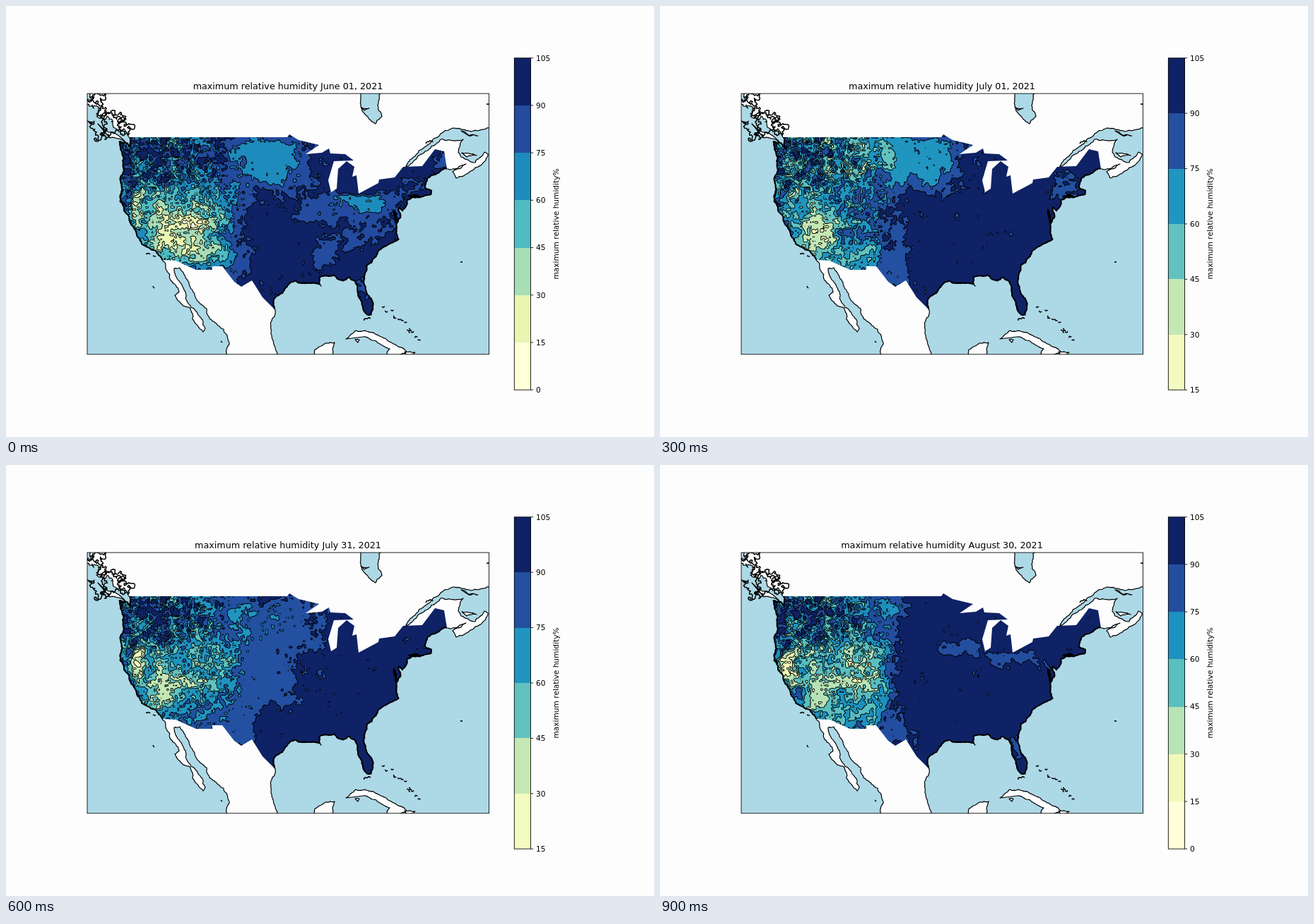
An HTML page with a canvas for the animation above (1 s loop, 917x611 px).

```html
<!DOCTYPE html>
<html lang="en">
<head>
<meta charset="utf-8">
<title>Maximum relative humidity</title>
<style>
html, body { margin: 0; width: 100%; height: 100%; overflow: hidden; background: #fdfdfd; }
canvas, svg { position: absolute; left: 0; top: 0; display: block; }
text { font-family: "DejaVu Sans", Verdana, sans-serif; font-size: 10.61px; fill: #000; }
#title { font-size: 12.73px; }
.line { fill: none; stroke: #000; stroke-width: .85; }
</style>
</head>
<body>
<canvas id="map" width="917" height="611"></canvas>
<svg width="917" height="611" viewBox="0 0 917 611">
  <rect class="line" x="115" y="124.1" width="568.5" height="369.7"/>
  <text id="title" x="399" y="117.7" text-anchor="middle"></text>
  <g id="bar"></g>
  <rect class="line" x="719.3" y="73.7" width="23.2" height="470.5"/>
  <text transform="translate(781.8 309) rotate(-90)" text-anchor="middle">maximum relative humidity%</text>
</svg>
<script>
// Key points of the coast, counter-clockwise; ragged() adds the detail between them.
const fjords = "108,124 122,140 130,149 139,160 152,172 172,183";
const pacific = "174,186 175,199 172,194 160,192 166,215 162,251 164,260 161,277 174,299 182,317 192,338 211,347 221,360";
const baja = "221,360 233,389 245,405 239,410 261,429 264,444 279,462 282,457 270,434 250,398 238,372 246,371 259,392 284,429 308,458 316,477 312,488 316,500";
const mexico = "392,505 380,482 376,467 381,431";
const gulf = "381,431 380,415 399,396 409,390 429,393 446,397 444,385 464,382 477,390 485,385 497,397 500,415 511,438 517,438 519,419 508,381";
const atlantic = "508,381 511,368 529,346 542,338 556,331 553,318 549,290 553,309 559,298 556,286 561,291 568,275 584,270 571,270 602,267 602,261 594,258 597,244 624,231";
const canada = "624,231 651,224 632,235 637,244 673,225 682,210 677,207 664,222 644,214 640,207 647,189 615,189 590,209 566,228 600,195 630,174 690,174";
const rio = "240,361 269,374 292,374 292,369 306,369 323,391 333,398 348,389 363,413 381,431";
const north = "624,231 620,206 607,203 589,227 562,228 550,243 528,246 527,251 499,266 496,240 490,242 493,228 482,220 470,231 468,259 460,264 456,247 464,220 492,219 480,210 459,209 457,202 447,208 424,210 443,197 414,190 401,182 398,186 174,186";
const bay = "502,118 505,150 523,167 525,162 532,157 527,135 533,118";
const islands = [
  "130,167 155,181 170,194 147,187",
  "503,144 514,145 507,148",
  "644,177 668,184 655,184",
  "645,208 666,212 652,214",
  "481,472 495,460 520,463 548,479 567,490 538,495 543,486 524,475 505,469",
  "494,473 500,473 498,477",
  "435,500 437,487 452,478 465,477 461,500",
  "564,490 579,491 570,500"
];
const specks = ["643,363 646,363", "208,397 210,400", "304,475 306,477", "198,351 204,352", "208,354 212,355", "507,446 516,443", "680,139 684,138", "594,195 604,193"];

// Areas of the map: centre and half size.
const area = (x, y, rx, ry) => ({ x, y, rx, ry });
const areas = {
  northwest: area(225, 222, 72, 46),
  coast: area(166, 225, 9, 46),
  basin: area(238, 283, 74, 34),
  southwest: area(248, 325, 68, 50),
  desert: area(247, 320, 36, 27),
  mojave: area(226, 322, 27, 26),
  valley: area(184, 287, 10, 21),
  rockies: area(285, 295, 30, 42),
  arizona: area(272, 352, 36, 20),
  montana: area(308, 210, 30, 25),
  border: area(330, 190, 72, 6),
  plains: area(345, 225, 78, 38),
  dakotas: area(375, 215, 40, 31),
  nebraska: area(366, 270, 33, 35),
  kansas: area(368, 305, 43, 36),
  colorado: area(327, 302, 13, 18),
  highPlains: area(330, 325, 20, 45),
  westTexas: area(331, 373, 18, 24),
  lakes: area(432, 222, 30, 34),
  iowa: area(426, 259, 28, 13),
  midwest: area(478, 284, 74, 20),
  ohio: area(500, 275, 38, 12),
  tennessee: area(450, 350, 20, 24),
  carolina: area(515, 320, 42, 23),
  newEngland: area(572, 247, 26, 18),
  maine: area(610, 217, 14, 13),
  florida: area(505, 400, 8, 15)
};

// Humidity that each area is drawn towards, painted in order.
const june01 = { northwest: 74, plains: 82, dakotas: 65, basin: 60, southwest: 44, desert: 25, valley: 38, coast: 94,
  midwest: 83, ohio: 68, tennessee: 84, carolina: 88, newEngland: 89, maine: 89, florida: 87 };
const june21 = { northwest: 86, plains: 82, kansas: 82, dakotas: 66, nebraska: 66, highPlains: 80, westTexas: 70,
  basin: 52, southwest: 37, desert: 24, valley: 40, lakes: 83, maine: 84, coast: 95 };
const july01 = { plains: 80, northwest: 64, basin: 64, southwest: 62, rockies: 74, dakotas: 66, montana: 56, mojave: 34,
  arizona: 60, highPlains: 89, westTexas: 82, coast: 86, newEngland: 87 };
const july21 = { plains: 80, kansas: 82, lakes: 84, northwest: 82, montana: 70, basin: 66, southwest: 64, mojave: 42,
  rockies: 66, valley: 30, arizona: 66, highPlains: 94, westTexas: 82 };
const aug10 = { plains: 80, nebraska: 80, kansas: 82, dakotas: 72, highPlains: 66, northwest: 70, basin: 52,
  southwest: 58, rockies: 48, mojave: 34, valley: 36, arizona: 91, border: 94, westTexas: 82, midwest: 92, newEngland: 88, coast: 92 };
const aug20 = { northwest: 82, basin: 80, mojave: 52, valley: 42, highPlains: 82, colorado: 58, westTexas: 84, lakes: 90, newEngland: 89 };
const aug30 = { northwest: 72, montana: 70, basin: 50, southwest: 60, rockies: 44, mojave: 37, valley: 28, arizona: 58,
  coast: 94, westTexas: 85, iowa: 84, ohio: 84, florida: 88 };
const terrain = { northwest: 44, basin: 30, southwest: 17, rockies: 24, coast: 40 };

const day = (date, maps, min, low = min < 15 ? 0 : 15, step = 15, high = 105) => ({ date, maps, min, low, step, high });
// Two maps stand for their average.
const days = [
  day("June 01", [june01], 10), day("June 11", [june01, june21], 10), day("June 21", [june21], 10.5),
  day("July 01", [july01], 16), day("July 11", [july01, july21], 16), day("July 21", [july21], 17),
  day("July 31", [july21, aug10], 16), day("August 10", [aug10], 16),
  day("August 20", [aug20], 20.5, 20, 10, 100), day("August 30", [aug30], 13.5)
];

const X0 = 155, Y0 = 179, W = 474, H = 264;
const clamp = (v, a, b) => Math.min(b, Math.max(a, v));

function hash(i, j, s) {
  let h = Math.imul(i, 374761393) + Math.imul(j, 668265263) + Math.imul(s, 982451653);
  h = Math.imul(h ^ h >>> 13, 1274126177);
  return ((h ^ h >>> 16) >>> 0) / 2147483648 - 1;
}

function noise(x, y, size, s) {
  x /= size; y /= size;
  const i = Math.floor(x), j = Math.floor(y);
  let u = x - i, v = y - j;
  u *= u * (3 - 2 * u); v *= v * (3 - 2 * v);
  const a = hash(i, j, s), b = hash(i + 1, j, s), c = hash(i, j + 1, s), d = hash(i + 1, j + 1, s);
  return a + (b - a) * u + (c - a + (a - b - c + d) * u) * v;
}

// Midpoint displacement between key points.
function ragged(text, amp = .13) {
  const pts = text.split(" ").map(p => p.split(",").map(Number)), out = [pts[0]];
  const split = ([ax, ay], [bx, by]) => {
    const dx = bx - ax, dy = by - ay;
    if (Math.hypot(dx, dy) < 3) return out.push([bx, by]);
    const k = amp * hash(Math.round(ax * 9 + bx * 7), Math.round(ay * 9 + by * 7), 5);
    const mid = [(ax + bx) / 2 - dy * k, (ay + by) / 2 + dx * k];
    split([ax, ay], mid);
    split(mid, [bx, by]);
  };
  for (let i = 1; i < pts.length; i++) split(pts[i - 1], pts[i]);
  return out.map(p => p[0].toFixed(1) + "," + p[1].toFixed(1)).join(" ");
}

const line = text => new Path2D("M" + text);
const shape = (...parts) => new Path2D("M" + parts.join(" L") + " Z");
const west = ragged(pacific), south = ragged(gulf), east = ragged(atlantic);
const land = shape("100,110", ragged(fjords, .6), west, ragged(baja), ragged(mexico), south, east, ragged(canada), "690,110");
const states = shape(west, rio, south, east, north);
const shores = [west, south, east].map(line);
const bayShape = shape(ragged(bay));
const isles = islands.map(s => shape(ragged(s)));
const marks = specks.map(s => line(ragged(s, .4)));
for (let k = 0; k < 3; k++) marks.push(line(ragged(`${115 + k * 2},${135 - k * 3} ${138 + k},${160 - k * 2} 168,182`, .65)));
// Chain of small cays running south-east.
for (let k = 0; k < 12; k++) {
  const x = 534 + k * 4.6 + 3 * hash(k, 1, 8), y = 423 + k * 4.4 + 5 * hash(k, 2, 8);
  marks.push(line(ragged(`${x},${y} ${x + 4},${y + 2 + 3 * hash(k, 3, 8)}`, .4)));
}

function paint(map, x, y, v) {
  for (const [a, target] of map) {
    const dx = (x - a.x) / a.rx, dy = (y - a.y) / a.ry, d = dx ** 4 + dy ** 4;
    if (d < 6) v += (target - v) * Math.exp(-.7 * d);
  }
  return v;
}

function grid(fn) {
  const g = new Float32Array(W * H);
  for (let j = 0, i = 0; j < H; j++) for (let x = 0; x < W; x++, i++) g[i] = fn(x + X0, j + Y0, i);
  return g;
}

const brush = map => Object.entries(map).map(([name, v]) => [areas[name], v]);
const hills = brush(terrain);
const relief = grid((x, y) => paint(hills, x, y, 8) *
  (.45 * noise(x, y, 14, 1) + .5 * noise(x, y, 6, 2) + .45 * noise(x, y, 3, 3)));

const fields = new Map();
function field(map) {
  if (!fields.has(map)) {
    const spots = brush(map), s = 10 + fields.size * 5;
    fields.set(map, grid((x, y, i) => {
      const wave = n => .6 * noise(x, y, 20, s + n) + .4 * noise(x, y, 8, s + n + 1);
      const a = wave(0), b = wave(2);
      return paint(spots, x + 13 * a, y + 13 * b, 98) + 6 * b + relief[i];
    }));
  }
  return fields.get(map);
}

const ramp = ["ffffd9", "edf8b1", "c7e9b4", "7fcdbb", "41b6c4", "1d91c0", "225ea8", "253494", "081d58"]
  .map(h => [0, 2, 4].map(i => parseInt(h.slice(i, i + 2), 16)));

function bandColors(d) {
  const list = [];
  for (let v = d.low; v < d.high; v += d.step) {
    const t = clamp((v + d.step / 2 - d.min) / (100 - d.min), 0, 1) * 8, k = Math.min(7, Math.floor(t));
    list.push(ramp[k].map((c, i) => Math.round(c + (ramp[k + 1][i] - c) * (t - k))));
  }
  return list;
}

function contours(d) {
  const sets = d.maps.map(field);
  const v = grid((x, y, i) => clamp(sets.reduce((sum, f) => sum + f[i], 0) / sets.length, d.min, 99.5));
  const colors = bandColors(d), last = colors.length - 1;
  const layer = document.createElement("canvas");
  layer.width = W; layer.height = H;
  const c = layer.getContext("2d"), img = c.createImageData(W, H);
  for (let i = 0; i < W * H; i++) {
    const q = (v[i] - d.low) / d.step;
    const level = clamp(Math.round(q), 1, last);
    const gx = ((v[i + 1] ?? v[i]) - (v[i - 1] ?? v[i])) / 2;
    const gy = ((v[i + W] ?? v[i]) - (v[i - W] ?? v[i])) / 2;
    // Distance to the contour in pixels.
    const far = Math.abs(q - level) * d.step / (Math.hypot(gx, gy) + 1e-6);
    const light = 1 - clamp(1.05 - far, 0, 1);
    const rgb = colors[clamp(Math.floor(q), 0, last)];
    for (let k = 0; k < 3; k++) img.data[i * 4 + k] = rgb[k] * light;
    img.data[i * 4 + 3] = 255;
  }
  c.putImageData(img, 0, 0);
  return layer;
}

const ctx = document.getElementById("map").getContext("2d");
function drawMap(layer) {
  const fill = (color, ...paths) => { ctx.fillStyle = color; paths.forEach(p => ctx.fill(p)); };
  const stroke = (width, paths) => { ctx.lineWidth = width; paths.forEach(p => ctx.stroke(p)); };
  ctx.clearRect(0, 0, 917, 611);
  ctx.save();
  ctx.beginPath();
  ctx.rect(115, 124.1, 568.5, 369.7);
  ctx.clip();
  ctx.fillStyle = "#add8e6";
  ctx.fillRect(115, 124, 569, 370);
  ctx.lineJoin = "round";
  fill("#fdfdfd", land);
  fill("#add8e6", bayShape);
  fill("#fdfdfd", ...isles);
  ctx.save();
  ctx.clip(states);
  ctx.drawImage(layer, X0, Y0);
  stroke(3, shores);
  ctx.restore();
  stroke(1.2, [land, bayShape, ...isles]);
  stroke(1.5, marks);
  ctx.restore();
}

function barMarkup(d) {
  const colors = bandColors(d), h = 470.5 / colors.length;
  let out = "";
  for (let k = 0; k <= colors.length; k++) {
    const y = 544.2 - k * h;
    if (k < colors.length)
      out += `<rect x="719.3" y="${y - h}" width="23.2" height="${h}" fill="rgb(${colors[k]})" shape-rendering="crispEdges"/>`;
    out += `<path class="line" d="M742.5 ${y}h3.7"/><text x="750" y="${y + 3.9}">${d.low + k * d.step}</text>`;
  }
  return out;
}

const layers = days.map(contours);
const title = document.getElementById("title"), bar = document.getElementById("bar");
let shown = -1;

function show(ms) {
  const n = Math.floor(ms % 1000 / 100);
  if (n === shown) return;
  shown = n;
  title.textContent = `maximum relative humidity ${days[n].date}, 2021`;
  bar.innerHTML = barMarkup(days[n]);
  drawMap(layers[n]);
}

const start = performance.now();
function tick() {
  show(performance.now() - start);
  requestAnimationFrame(tick);
}
tick();
</script>
</body>
</html>
```
